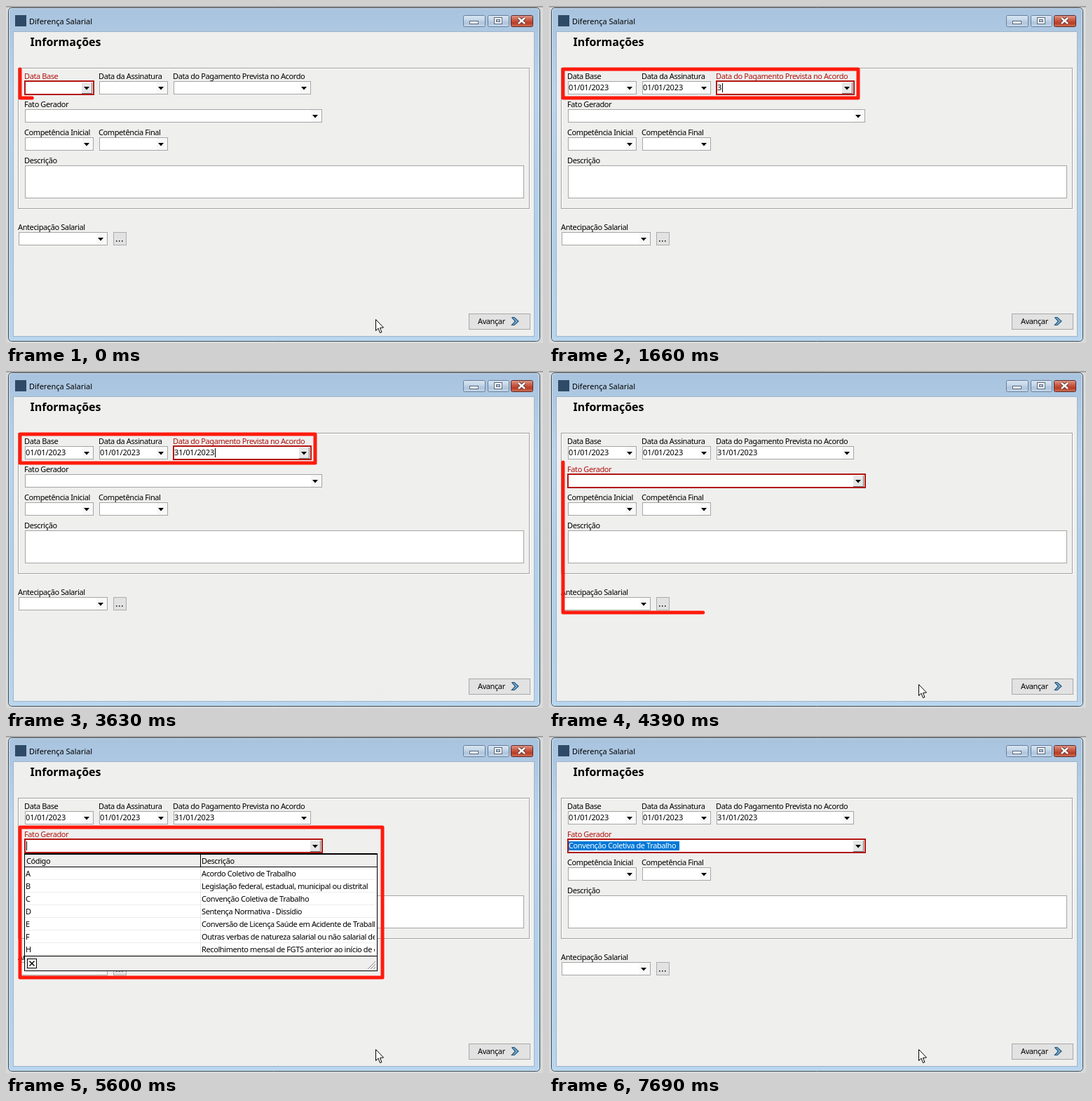
Animation, 766 px wide and 480 px high, one loop 8000 ms. Source, as an HTML page with a canvas:

```html
<!DOCTYPE html>
<html lang="pt-BR">
<head>
<meta charset="utf-8">
<title>Diferença Salarial</title>
<style>
html, body { margin: 0; width: 100%; height: 100%; overflow: hidden; }
canvas { display: block; }
</style>
</head>
<body>
<canvas id="stage" width="766" height="480"></canvas>
<script>
const W = 766, H = 480, LOOP = 8000;
const stage = document.getElementById('stage').getContext('2d');
const layer = Object.assign(document.createElement('canvas'), { width: W, height: H });
const layerCtx = layer.getContext('2d');
let g = stage;

const FACE = '#efefee', RED = '#ff1a0c', FOCUS = '#b3150f', BLUE = '#0078d7';
const SMALL = '11px "Noto Sans", sans-serif';
const TIGHT = -0.4, DIGITS = -0.15;
const KEYS = [[1660, 1], [1990, 2], [2260, 3], [2470, 4], [2730, 5], [2800, 6],
  [3000, 7], [3200, 8], [3340, 9], [3410, 10]];
const ROWS = [
  ['A', 'Acordo Coletivo de Trabalho'],
  ['B', 'Legislação federal, estadual, municipal ou distrital'],
  ['C', 'Convenção Coletiva de Trabalho'],
  ['D', 'Sentença Normativa - Dissídio'],
  ['E', 'Conversão de Licença Saúde em Acidente de Trabalho'],
  ['F', 'Outras verbas de natureza salarial ou não salarial devidas'],
  ['H', 'Recolhimento mensal de FGTS anterior ao início de obrigação']
];
const PICK = 2;

function fill(x, y, w, h, color) {
  g.fillStyle = color;
  g.fillRect(x, y, w, h);
}

function box(x, y, w, h, color, border) {
  fill(x, y, w, h, border);
  fill(x + 1, y + 1, w - 2, h - 2, color);
}

function text(s, x, y, color = '#000', font = SMALL, spacing = TIGHT) {
  g.font = font;
  g.letterSpacing = spacing + 'px';
  g.fillStyle = color;
  g.fillText(s, x, y);
  return g.measureText(s).width;
}

function path(points, color, width = 0) {
  g.beginPath();
  points.forEach(([x, y]) => g.lineTo(x, y));
  if (width) {
    g.strokeStyle = color;
    g.lineWidth = width;
    g.stroke();
  } else {
    g.fillStyle = color;
    g.fill();
  }
}

function shade(y0, y1, ...colors) {
  const s = g.createLinearGradient(0, y0, 0, y1);
  colors.forEach((c, i) => s.addColorStop(i / (colors.length - 1), c));
  return s;
}

function roundBox(x, y, w, h, radius, color, border) {
  g.beginPath();
  g.roundRect(x + .5, y + .5, w - 1, h - 1, radius);
  g.fillStyle = color;
  g.fill();
  g.strokeStyle = border;
  g.lineWidth = 1;
  g.stroke();
}

function combo(label, x, y, w, options = {}) {
  const { value = '', spacing = DIGITS, focus, caret, selected } = options;
  text(label, x - 1, y - 3, focus ? FOCUS : '#000');
  box(x, y, w, 19, '#fff', '#a6a6a6');
  const ax = x + w - 10, ay = y + 8;
  if (focus) {
    fill(ax - 7, y + 2, 15, 16, '#707070');
    fill(ax - 7, y + 2, 14, 15, '#e6e6e6');
    g.strokeStyle = FOCUS;
    g.lineWidth = 2;
    g.strokeRect(x, y, w, 19);
  } else fill(ax - 6, y + 1, 15, 17, '#f8f8f8');
  path([[ax - 4, ay], [ax + 4, ay], [ax, ay + 4.5]], '#000');
  if (selected) fill(x + 1, y + 3, 158, 13, BLUE);
  const end = text(value, x + 1, y + 13, selected ? '#fff' : '#000', SMALL, spacing);
  if (caret) fill(Math.round(x + 2 + end), y + 3, 1, 13, '#000');
}

function titleButton(x, w, isClose) {
  const color = isClose ? shade(13, 30, '#e0a193', '#cf6650', '#b83c25', '#d4795e')
    : shade(13, 30, '#dce8f4', '#c9daeb', '#afc5dc', '#cbdcee');
  roundBox(x, 13, w, 17, 2, color, isClose ? '#5c2a2a' : '#697f98');
}

function windowFrame() {
  fill(0, 0, W, H, '#d9d9d9');
  fill(0, 0, W, 2, '#a3a3a3');
  const glass = shade(2, 478, '#a8c3de', '#bcd5ed', '#b4d0ea', '#b4d0ea', '#bad5ee');
  roundBox(3, 2, 759, 476, 5, glass, '#3c4650');
  roundBox(4, 3, 757, 474, 4, 'transparent', shade(3, 477, '#d3e3f2', '#bfe3f5'));
  box(10, 36, 744, 435, FACE, '#9db4ca');
  fill(13, 13, 16, 16, '#2e4a66');
  text('Diferença Salarial', 33, 26, '#000', SMALL, 0);

  titleButton(652, 32);
  titleButton(687, 31);
  titleButton(720, 32, true);
  box(661, 21, 13, 5, '#fff', '#55657a');
  box(696, 16, 12, 10, '#fff', '#55657a');
  box(699, 19, 6, 4, '#b9cde2', '#55657a');
  for (const [color, width] of [['#63393a', 4.5], ['#fff', 2.5]]) {
    path([[731, 17], [740, 25]], color, width);
    path([[740, 17], [731, 25]], color, width);
  }
}

function dropdown(picked) {
  box(26, 167, 504, 168, '#fff', '#000');
  fill(27, 168, 502, 18, FACE);
  fill(27, 168, 502, 1, '#000');
  text('Código', 29, 182);
  text('Descrição', 279, 182);
  g.save();
  g.beginPath();
  g.rect(27, 168, 499, 166);
  g.clip();
  ROWS.forEach(([code, name], i) => {
    const y = 187 + 18 * i, on = picked && i === PICK;
    if (on) fill(27, y, 502, 17, BLUE);
    fill(27, y + 17, 502, 1, '#ececec');
    text(code, 28, y + 13, on ? '#fff' : '#000');
    text(name, 279, y + 13, on ? '#fff' : '#000');
  });
  g.restore();
  if (picked) fill(526, 223, 3, 17, BLUE);
  fill(27, 186, 502, 1, '#000');
  fill(277, 168, 1, 18, '#000');
  fill(277, 187, 1, 126, '#e4e4e4');
  fill(27, 313, 502, 21, FACE);
  fill(27, 313, 502, 1, '#000');
  box(30, 317, 14, 14, '#fff', '#000');
  path([[33.5, 320.5], [40.5, 327.5]], '#000', 1.5);
  path([[40.5, 320.5], [33.5, 327.5]], '#000', 1.5);
  for (const d of [3, 7, 11]) path([[527 - d, 332], [527, 332 - d]], '#8c8c8c', 1);
}

// Outline traced counterclockwise from the top left corner.
function outline(x, y, w, h, start, t) {
  const u = Math.min(1, (t - start) / 1100);
  if (u <= 0) return;
  const eased = u - .25 * Math.sin(2 * Math.PI * u) / (2 * Math.PI);
  const total = 2 * (w + h);
  g.save();
  g.strokeStyle = RED;
  g.lineWidth = 5;
  g.lineCap = g.lineJoin = 'round';
  g.setLineDash([total * eased, total]);
  g.beginPath();
  g.moveTo(x, y);
  g.lineTo(x, y + h);
  g.lineTo(x + w, y + h);
  g.lineTo(x + w, y);
  g.lineTo(x, y);
  g.stroke();
  g.restore();
}

function mouse() {
  const shape = [[527.5, 446.5], [527.5, 462.5], [531, 459], [533.5, 465.5], [536, 464.5],
    [533.5, 458.5], [538.5, 458], [527.5, 446.5]];
  path(shape, '#fff');
  path(shape, '#000', 1);
}

function scene(t) {
  const focus = t < 1660 ? 0 : t < 3900 ? 2 : 3;
  const typed = KEYS.reduce((n, [at, count]) => t >= at ? count : n, 0);
  const open = t >= 4870 && t < 7690, done = t >= 7690;
  const date = '01/01/2023';

  windowFrame();
  text('Informações', 34.5, 57, '#000', 'bold 16px "Noto Sans", sans-serif', 0);
  g.lineWidth = 1;
  g.strokeStyle = '#fff';
  g.strokeRect(18.5, 89.5, 729, 200);
  g.strokeStyle = '#a0a0a0';
  g.strokeRect(17.5, 88.5, 729, 200);

  combo('Data Base', 27, 107, 98, { value: t >= 1290 ? date : '', focus: focus === 0 });
  combo('Data da Assinatura', 133, 107, 98, { value: t >= 1660 ? date : '' });
  combo('Data do Pagamento Prevista no Acordo', 239, 107, 196,
    { value: '31/01/2023'.slice(0, typed), focus: focus === 2, caret: focus === 2 });
  combo('Fato Gerador', 27, 147, 424, {
    value: done ? ROWS[PICK][1] : '', spacing: TIGHT, focus: focus === 3, selected: done,
    caret: t >= 5600 && t < 6160 || t >= 6560 && !done
  });
  combo('Competência Inicial', 27, 187, 98);
  combo('Competência Final', 133, 187, 98);
  text('Descrição', 26, 224);
  box(27, 227, 712, 47, '#fff', '#a6a6a6');
  combo('Antecipação Salarial', 18, 322, 127);
  box(153, 322, 19, 19, '#e2e2e2', '#adadad');
  for (const x of [157, 161, 165]) fill(x, 334, 1.5, 1.5, '#000');

  box(660, 438, 88, 23, '#e2e2e2', '#a8a8a8');
  text('Avançar', 673, 453);
  const chevron = [[721.5, 443.5], [725, 443.5], [731, 449], [725, 454.5], [721.5, 454.5],
    [726.5, 449], [721.5, 443.5]];
  path(chevron, '#7fb2d6');
  path(chevron, '#27587d', 1.2);

  if (open) dropdown(t >= 6560);
  if (t < 3900) outline(20, 90, 421, 41, -90, t);
  else if (!done) outline(20, 130, 517, 214, 4040, t);
  if (focus !== 2) mouse();
}

function fade(from, to, t) {
  scene(from);
  g = layerCtx;
  scene(to);
  g = stage;
  g.globalAlpha = (t - from) / (to - from);
  g.drawImage(layer, 0, 0);
  g.globalAlpha = 1;
}

function frame(now) {
  const t = now % LOOP;
  if (t >= 3630 && t < 3900) fade(3630, 3900, t);
  else if (t >= 7500 && t < 7690) fade(7500, 7690, t);
  else scene(t);
  requestAnimationFrame(frame);
}
requestAnimationFrame(frame);
</script>
</body>
</html>
```
